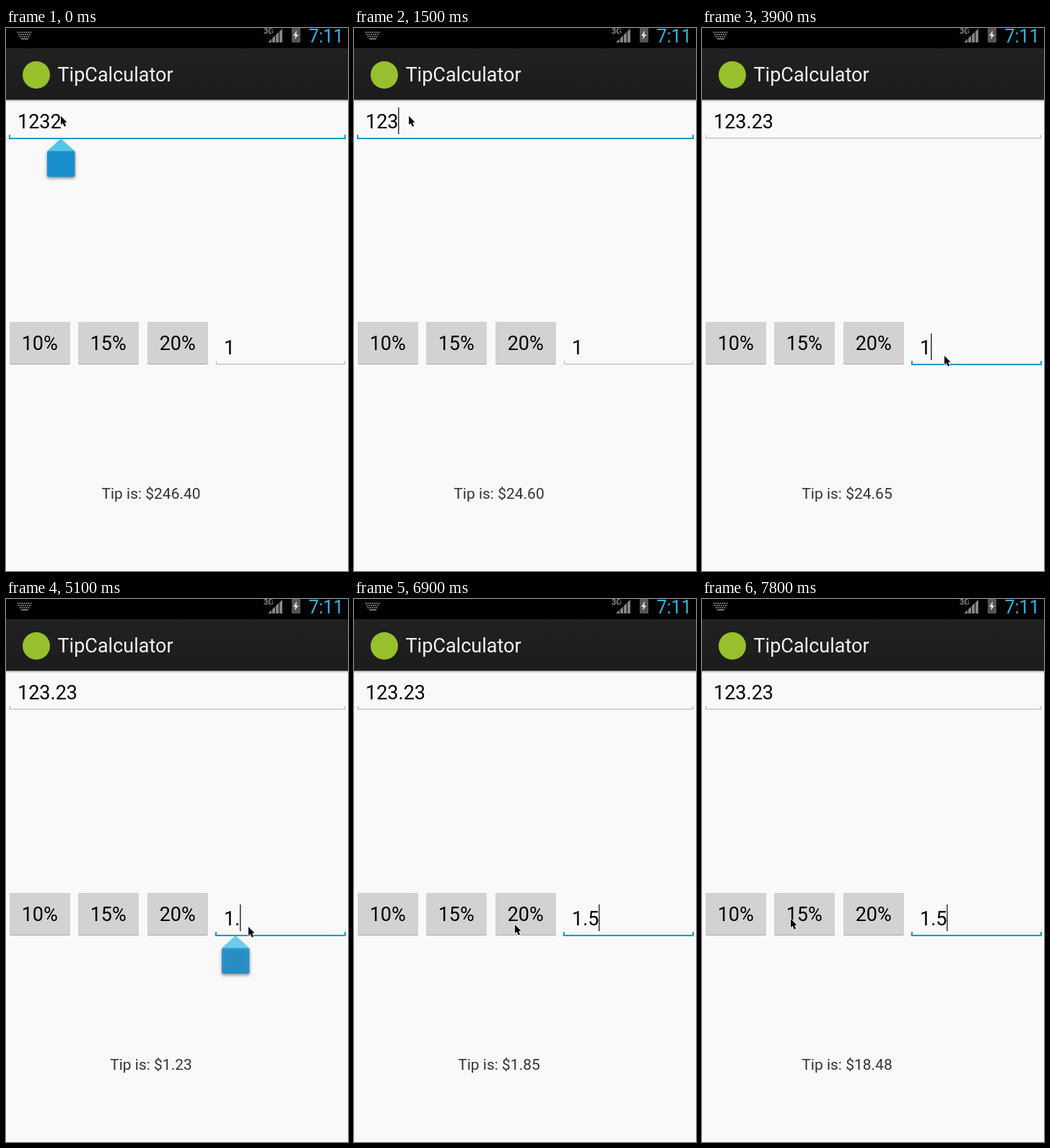
Write an HTML page with a canvas that moves like this. It is 474x752 px and loops after 8 s.

```html
<!DOCTYPE html>
<html lang="en">
<head>
<meta charset="utf-8">
<title>Tip calculator</title>
<style>
html, body { margin: 0; width: 100%; height: 100%; overflow: hidden; background: #f9f9f9; }
canvas { display: block; }
</style>
</head>
<body>
<canvas id="stage" width="474" height="752"></canvas>
<script>
const ctx = document.getElementById('stage').getContext('2d');
const LOOP = 8000, TICK = 150, BLINK = 540, FADE = 220;
const BLUE = '#109bc9';

// What the user does; caret, handle and tip all follow from these events.
const events = [
  { time: -1000, field: 'amount', value: '1232' },
  { time: 280, field: 'amount', key: '\b' },
  { time: 2000, field: 'amount', key: '.' },
  { time: 2200, field: 'amount', key: '2' },
  { time: 2350, field: 'amount', key: '3' },
  { time: 3780, field: 'rate', value: '1' },
  { time: 5070, field: 'rate', key: '.' },
  { time: 5350, field: 'rate', key: '5' }
];
const TAP = { press: 7650, release: 7800, percent: 15 };
const route = [
  { time: 2400, x: 76, y: 122 },
  { time: 2850, x: 185, y: 357 },
  { time: 3450, x: 333, y: 451 },
  { time: 3750, x: 333, y: 451 },
  { time: 3900, x: 336, y: 454 },
  { time: 6750, x: 335, y: 454 },
  { time: 6900, x: 223, y: 451 },
  { time: 7350, x: 123, y: 443 }
];

const clamp = v => Math.min(1, Math.max(0, v));

function pointerAt(t) {
  const next = route.findIndex(p => p.time > t);
  if (next === 0) return route[0];
  if (next < 0) return route[route.length - 1];
  const a = route[next - 1], b = route[next];
  const k = (t - a.time) / (b.time - a.time);
  return { x: Math.round(a.x + (b.x - a.x) * k), y: Math.round(a.y + (b.y - a.y) * k) };
}

function stateAt(t) {
  const s = { amount: '', rate: '1', percent: 20, handle: 0 };
  for (const e of events.filter(e => e.time <= t)) {
    s.field = e.field;
    if (e.key) {
      s[e.field] = e.key === '\b' ? s[e.field].slice(0, -1) : s[e.field] + e.key;
      if (e.field === 'rate') s.percent = parseFloat(s.rate);
      s.handle = Math.min(s.handle, clamp(1 - (t - e.time) / FADE));
    } else {
      s[e.field] = e.value;
      s.handle = clamp((t - e.time) / FADE - 1);
    }
    s.caret = e.time >= 0 && Math.floor((t - e.time) / BLINK) % 2 === 0;
  }
  if (t >= TAP.release) s.percent = TAP.percent;
  s.pressed = t >= TAP.press && t < TAP.release;
  s.tip = (parseFloat(s.amount) * s.percent / 100).toFixed(2);
  return s;
}

function rect(x, y, w, h, color) {
  ctx.fillStyle = color;
  ctx.fillRect(x, y, w, h);
}

function polygon(points, color) {
  ctx.beginPath();
  points.forEach(([x, y]) => ctx.lineTo(x, y));
  ctx.closePath();
  ctx.fillStyle = color;
  ctx.fill();
}

function roundRect(x, y, w, h, r, color) {
  ctx.beginPath();
  ctx.roundRect(x, y, w, h, r);
  ctx.fillStyle = color;
  ctx.fill();
}

function text(value, x, y, size, color, align = 'left', weight = 400) {
  ctx.font = `${weight} ${size}px Roboto, sans-serif`;
  ctx.textAlign = align;
  ctx.fillStyle = color;
  ctx.fillText(value, x, y);
}

function drawStatusBar() {
  rect(0, 0, 474, 28, '#000');
  for (let row = 0; row < 3; row++)
    for (let i = 0; i < 7 - row; i++)
      rect(15.5 + row * 1.5 + i * 3, 5 + row * 3, 2, 2, '#707070');
  rect(21, 14, 10, 2, '#707070');
  text('3G', 357, 8, 11, '#8c8c8c', 'left', 700);
  polygon([[363, 20], [384, 0], [384, 20]], '#858585');
  for (let x = 368; x < 384; x += 5) rect(x, 0, 1, 20, '#000');
  rect(396, 0, 12, 20, '#555');
  polygon([[403, 3], [398, 11], [401, 11], [400, 16], [405.5, 9], [402.5, 9]], '#ddd');
  text('7:11', 419.5, 20, 25, '#33b5e5');
}

function drawActionBar() {
  const shade = ctx.createLinearGradient(0, 28, 0, 99);
  shade.addColorStop(0, '#212121');
  shade.addColorStop(1, '#1c1c1c');
  rect(0, 28, 474, 71, shade);
  const edge = ctx.createLinearGradient(0, 98, 0, 103);
  edge.addColorStop(0.1, '#1c1c1c');
  edge.addColorStop(0.5, '#d0cccd');
  edge.addColorStop(1, '#f9f9f9');
  rect(0, 99, 474, 4, edge);
  ctx.beginPath();
  ctx.arc(42, 65, 19, 0, Math.PI * 2);
  ctx.fillStyle = '#97c02c';
  ctx.fill();
  text('TipCalculator', 71.5, 74, 27, '#f3f3f3');
}

function drawField(left, bottom, value, focused, caret) {
  const line = focused ? 2 : 1, grow = focused ? 1 : 0;
  const color = focused ? BLUE : '#b4b4b4';
  const right = 470 + grow;
  rect(left - grow, bottom - 2, right - left + grow, line, color);
  for (const x of [left - grow, right - line]) rect(x, bottom - 6, line, 5, color);
  text(value, left + 11, bottom - 15, 27, '#000');
  if (focused && caret)
    rect(Math.floor(left + 11 + ctx.measureText(value).width), bottom - 44, 1.5, 37, '#333');
}

function drawButton(x, label, pressed) {
  if (pressed) roundRect(x - 5, 401, 94, 70, 5, 'rgba(51,181,229,.35)');
  else roundRect(x, 407, 84, 59, 2, '#a8a8a8');
  roundRect(x, 407, 84, 58, 2, pressed ? '#7cc8e4' : '#d2d2d2');
  text(label, x + 41.7, 446, 27, '#000', 'center');
}

function drawHandle(x, y, alpha) {
  ctx.save();
  ctx.globalAlpha = alpha;
  ctx.shadowColor = 'rgba(0,0,0,.5)';
  ctx.shadowBlur = 4;
  ctx.shadowOffsetY = 2;
  roundRect(x - 19, y + 17, 38.5, 36, 2, '#188fcd');
  ctx.shadowColor = 'transparent';
  polygon([[x, y], [x + 19.5, y + 17.5], [x - 19, y + 17.5]], '#55c6e8');
  ctx.restore();
}

function drawPointer({ x, y }) {
  ctx.save();
  ctx.translate(x, y);
  ctx.strokeStyle = '#fff';
  ctx.lineWidth = 1.5;
  ctx.lineJoin = 'round';
  polygon([[0, 0], [0, 12], [2.7, 9.7], [4.8, 14.5], [7.2, 13.5], [5.1, 8.9], [8.5, 8.6]], '#000');
  ctx.stroke();
  ctx.fill();
  ctx.restore();
}

function draw(ms) {
  const t = Math.floor((ms % LOOP) / TICK) * TICK;
  const s = stateAt(t);
  const onAmount = s.field === 'amount';

  rect(0, 0, 474, 752, '#f9f9f9');
  drawStatusBar();
  drawActionBar();
  drawField(5, 154, s.amount, onAmount, s.caret);
  drawField(291, 467, s.rate, !onAmount, s.caret);
  [10, 15, 20].forEach((percent, i) =>
    drawButton(Math.round(5 + i * 95.3), percent + '%', s.pressed && percent === TAP.percent));
  text(`Tip is: $${s.tip}`, 201, 652, 21, '#333', 'center');
  drawHandle(onAmount ? 76 : 318, onAmount ? 153 : 466, s.handle);
  drawPointer(pointerAt(t));
}

const start = performance.now();
function frame() {
  draw(performance.now() - start);
  requestAnimationFrame(frame);
}
frame();
</script>
</body>
</html>
```
